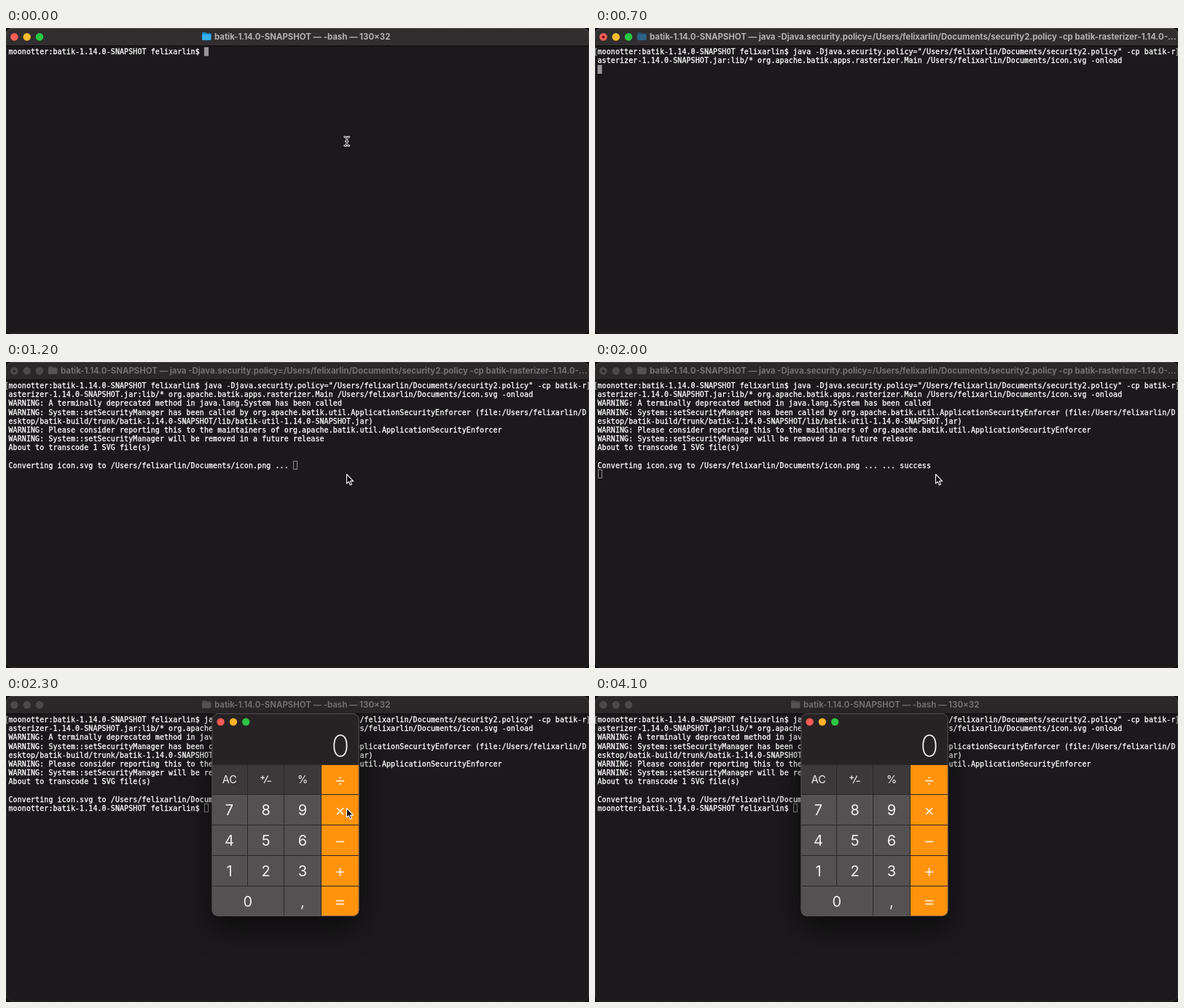
Animation, 800 px wide and 421 px high, one loop 4.2 s. Source, as an HTML page with a canvas:

```html
<!DOCTYPE html>
<html lang="en">
<head>
<meta charset="utf-8">
<title>Terminal session</title>
<style>
html, body { margin: 0; width: 100%; height: 100%; overflow: hidden; background: #140f13; }
canvas { display: block; width: 800px; height: 421px; }
</style>
</head>
<body>
<canvas id="stage" width="800" height="421"></canvas>
<script>
const ctx = document.getElementById('stage').getContext('2d');
const LOOP = 4200;
const COLS = 130, CELL = 6.1, ROW = 12.2, LEFT = 3.5, TOP = 26.4;
const MONO = '9.9px "DejaVu Sans Mono", monospace';
const SANS = 'Inter, sans-serif';

// When each part of the session happens, in ms
const AT = {
  paste: 100, enter: 600, running: 700, warnings: 800, convert: 1000,
  blur: 1100, arrow: 1200, success: 2000, prompt: 2100, done: 2200,
  calc: 2300, arrowUp: 3600, arrowGone: 3700
};

const HOME = '/Users/felixarlin';
const PROMPT = 'moonotter:batik-1.14.0-SNAPSHOT felixarlin$ ';
const COMMAND = `java -Djava.security.policy="${HOME}/Documents/security2.policy" -cp ` +
  `batik-rasterizer-1.14.0-SNAPSHOT.jar:lib/* org.apache.batik.apps.rasterizer.Main ${HOME}/Documents/icon.svg -onload`;
const WARNINGS = [
  'A terminally deprecated method in java.lang.System has been called',
  'System::setSecurityManager has been called by org.apache.batik.util.ApplicationSecurityEnforcer ' +
    `(file:${HOME}/Desktop/batik-build/trunk/batik-1.14.0-SNAPSHOT/lib/batik-util-1.14.0-SNAPSHOT.jar)`,
  'Please consider reporting this to the maintainers of org.apache.batik.util.ApplicationSecurityEnforcer',
  'System::setSecurityManager will be removed in a future release'
].map(s => 'WARNING: ' + s);
const CONVERT = `Converting icon.svg to ${HOME}/Documents/icon.png ... `;
const IDLE_TITLE = 'batik-1.14.0-SNAPSHOT — -bash — 130×32';
const BUSY_TITLE = `batik-1.14.0-SNAPSHOT — java -Djava.security.policy=${HOME}/Documents/security2.policy -cp batik-rasterizer-1.14.0-...`;

function sessionLines(t) {
  const lines = [PROMPT + (t >= AT.paste ? COMMAND : '')];
  if (t >= AT.warnings) lines.push(...WARNINGS);
  if (t >= AT.convert) {
    lines.push('About to transcode 1 SVG file(s)', '', CONVERT + (t >= AT.success ? '... success' : ''));
  }
  if (t >= AT.prompt) lines.push(PROMPT);
  else if (t >= AT.enter && t < AT.convert || t >= AT.success) lines.push('');
  return lines;
}

function wrap(line) {
  const rows = [];
  do {
    rows.push(line.slice(0, COLS));
    line = line.slice(COLS);
  } while (line);
  return rows;
}

function roundRect(x, y, w, h, r) {
  ctx.beginPath();
  ctx.roundRect(x, y, w, h, r);
}

function dot(x, y, r, color) {
  ctx.fillStyle = color;
  ctx.beginPath();
  ctx.arc(x, y, r, 0, Math.PI * 2);
  ctx.fill();
}

function segment(x1, y1, x2, y2) {
  ctx.beginPath();
  ctx.moveTo(x1, y1);
  ctx.lineTo(x2, y2);
  ctx.stroke();
}

function label(text, x, y, font, color, align = 'center') {
  ctx.font = font;
  ctx.fillStyle = color;
  ctx.textAlign = align;
  ctx.fillText(text, x, y);
}

function lights(x, y, colors) {
  colors.forEach((c, i) => dot(x + i * 17.3, y, 5.2, c));
}

function folder(x, y, back, front) {
  ctx.fillStyle = back;
  roundRect(x, y, 6, 5, 1.2);
  ctx.fill();
  roundRect(x, y + 1.3, 12.4, 8, 1.2);
  ctx.fill();
  ctx.fillStyle = front;
  roundRect(x, y + 2.8, 12.4, 8, 1.2);
  ctx.fill();
}

function drawWindow(t) {
  const focused = t < AT.blur;
  const busy = t >= AT.running && t < AT.done;
  ctx.fillStyle = '#140f13';
  ctx.fillRect(0, 0, 800, 421);
  ctx.save();
  roundRect(0, 0, 800, 420.5, 8.5);
  ctx.clip();
  ctx.fillStyle = '#1b191b';
  ctx.fillRect(0, 0, 800, 421);
  ctx.fillStyle = focused ? '#312e30' : '#2b282a';
  ctx.fillRect(0, 0, 800, 24);
  ctx.fillStyle = '#0c0b0c';
  ctx.fillRect(0, 24, 800, 1);
  ctx.restore();

  const edge = ctx.createLinearGradient(0, 0, 0, 24);
  edge.addColorStop(0, focused ? '#565256' : '#454144');
  edge.addColorStop(1, '#2a282a');
  ctx.lineWidth = 1;
  ctx.strokeStyle = edge;
  roundRect(0.5, 0.5, 799, 419.5, 8.5);
  ctx.stroke();

  lights(11.4, 12.3, focused ? ['#ff5f57', '#febc2e', '#28c840'] : Array(3).fill('#4d494b'));
  if (busy) dot(11.4, 12.3, 1.9, focused ? '#6b0f12' : '#2a2729');
  const titleX = busy ? 75 : 286;
  const icon = !focused ? ['#4b4749', '#575355'] : busy ? ['#214d6c', '#2c6386'] : ['#1688c9', '#35b3ef'];
  folder(titleX - 17, 6, ...icon);
  label(busy ? BUSY_TITLE : IDLE_TITLE, titleX, 16.1, `700 11.4px ${SANS}`, focused ? '#b4b1b3' : '#757173', 'left');
}

function drawCell(ch, col, row, color) {
  const x = LEFT + col * CELL, y = TOP + row * ROW + 9.5;
  ctx.fillStyle = ctx.strokeStyle = color;
  ctx.fillText(ch, x, y);
  ctx.strokeText(ch, x, y);
}

function drawText(t) {
  const rows = sessionLines(t).flatMap(wrap);
  ctx.font = MONO;
  ctx.textAlign = 'left';
  ctx.lineWidth = 0.3;
  rows.forEach((text, row) => {
    [...text].forEach((ch, col) => {
      if (ch !== ' ') drawCell(ch, col, row, '#ffffff');
    });
  });
  if (t >= AT.enter) {
    drawCell('[', -0.9, 0, '#a5a3a4');
    drawCell(']', COLS - 0.1, 0, '#a5a3a4');
  }
  const last = rows.length - 1;
  const x = LEFT + rows[last].length * CELL, y = TOP + last * ROW;
  if (t < AT.blur) {
    ctx.fillStyle = '#989697';
    ctx.fillRect(x, y, CELL, ROW);
  } else {
    ctx.strokeStyle = '#8d8b8c';
    ctx.lineWidth = 1;
    ctx.strokeRect(Math.round(x) + 0.5, Math.round(y) + 0.5, 5, 11);
  }
}

function drawSign(sign, x, y) {
  ctx.strokeStyle = '#fff3e2';
  ctx.lineWidth = 1.7;
  const bar = dy => segment(x - 5.5, y + dy, x + 5.5, y + dy);
  if (sign === '÷') {
    bar(0);
    dot(x, y - 4.2, 1.2, '#fff3e2');
    dot(x, y + 4.2, 1.2, '#fff3e2');
  } else if (sign === '×') {
    segment(x - 4.6, y - 4.6, x + 4.6, y + 4.6);
    segment(x - 4.6, y + 4.6, x + 4.6, y - 4.6);
  } else if (sign === '=') {
    bar(-2.3);
    bar(2.3);
  } else {
    bar(0);
    if (sign === '+') segment(x, y - 5.5, x, y + 5.5);
  }
}

function drawCalculator() {
  const x = 282.5, y = 24, w = 202, h = 279, keyTop = 94, keyH = 41.8;
  const ink = '#f1efef';
  ctx.save();
  ctx.shadowColor = 'rgba(0,0,0,.6)';
  ctx.shadowBlur = 38;
  ctx.shadowOffsetY = 14;
  ctx.fillStyle = '#272324';
  roundRect(x, y, w, h, 8.5);
  ctx.fill();
  ctx.restore();

  ctx.save();
  roundRect(x, y, w, h, 8.5);
  ctx.clip();
  ctx.fillStyle = '#3c393a';
  ctx.fillRect(x, keyTop, 150, keyH);
  ctx.fillStyle = '#545152';
  ctx.fillRect(x, keyTop + keyH, 150, 4 * keyH);
  ctx.fillStyle = '#ff930d';
  ctx.fillRect(432.5, keyTop, 52, 5 * keyH);
  ctx.strokeStyle = '#2b2728';
  ctx.lineWidth = 1;
  for (let i = 0; i < 5; i++) {
    const ly = Math.floor(keyTop + i * keyH) + 0.5;
    segment(x, ly, x + w, ly);
  }
  segment(331.5, keyTop, 331.5, 261);
  segment(381.5, keyTop, 381.5, 303);
  segment(432.5, keyTop, 432.5, 303);
  ctx.restore();
  ctx.strokeStyle = '#5d595a';
  ctx.lineWidth = 0.8;
  roundRect(x + 0.4, y + 0.4, w - 0.8, h - 0.8, 8.3);
  ctx.stroke();

  lights(294.6, 35.6, ['#fc5b57', '#fdb426', '#2dc642']);
  label('0', 459, 82.5, `200 41px ${SANS}`, ink);
  label('AC', 306.8, 120, `400 14.5px ${SANS}`, ink);
  label('%', 407, 120, `400 14.5px ${SANS}`, ink);
  ctx.strokeStyle = ink;
  ctx.lineWidth = 1.2;
  segment(349.5, 112.3, 355, 112.3);
  segment(352.2, 109.6, 352.2, 115);
  segment(354, 120, 359.6, 109.6);
  segment(358.6, 117.3, 363.8, 117.3);

  const digitFont = `400 20px ${SANS}`;
  for (let n = 1; n <= 9; n++) {
    const col = (n - 1) % 3, row = 2 - Math.floor((n - 1) / 3);
    label(n, 306.5 + col * 50.2, 164 + row * 42, digitFont, ink);
  }
  label('0', 331.8, 290, digitFont, ink);
  label(',', 407, 290, digitFont, ink);
  [...'÷×−+='].forEach((s, i) => drawSign(s, 458.6, 116.8 + i * 41.8));
}

function drawBeam(x, y) {
  const path = new Path2D('M-3 -6Q0 -6 0 -3.2V3.2Q0 6 -3 6M3 -6Q0 -6 0 -3.2M3 6Q0 6 0 3.2M-1.3 0H1.3');
  ctx.save();
  ctx.translate(x, y);
  ctx.strokeStyle = '#f2f2f2';
  ctx.lineWidth = 2.8;
  ctx.lineCap = 'round';
  ctx.stroke(path);
  ctx.strokeStyle = '#111';
  ctx.lineWidth = 0.9;
  ctx.stroke(path);
  ctx.restore();
}

function drawArrow(x, y) {
  ctx.save();
  ctx.translate(x, y);
  const path = new Path2D('M.5 .5V13.2L3.3 10.6L5.3 15.3L7.4 14.4L5.4 9.9H9.6Z');
  ctx.fillStyle = '#080808';
  ctx.fill(path);
  ctx.strokeStyle = '#ffffff';
  ctx.lineWidth = 1.1;
  ctx.lineJoin = 'round';
  ctx.stroke(path);
  ctx.restore();
}

function drawPointer(t) {
  if (t < AT.enter) drawBeam(467.7, 155.8);
  else if (t >= AT.arrow && t < AT.arrowUp) drawArrow(467, 154);
  else if (t >= AT.arrowUp && t < AT.arrowGone) drawArrow(493, 81);
}

const start = performance.now();

function frame() {
  const t = (performance.now() - start) % LOOP;
  drawWindow(t);
  drawText(t);
  if (t >= AT.calc) drawCalculator();
  drawPointer(t);
  requestAnimationFrame(frame);
}
frame();
</script>
</body>
</html>
```
